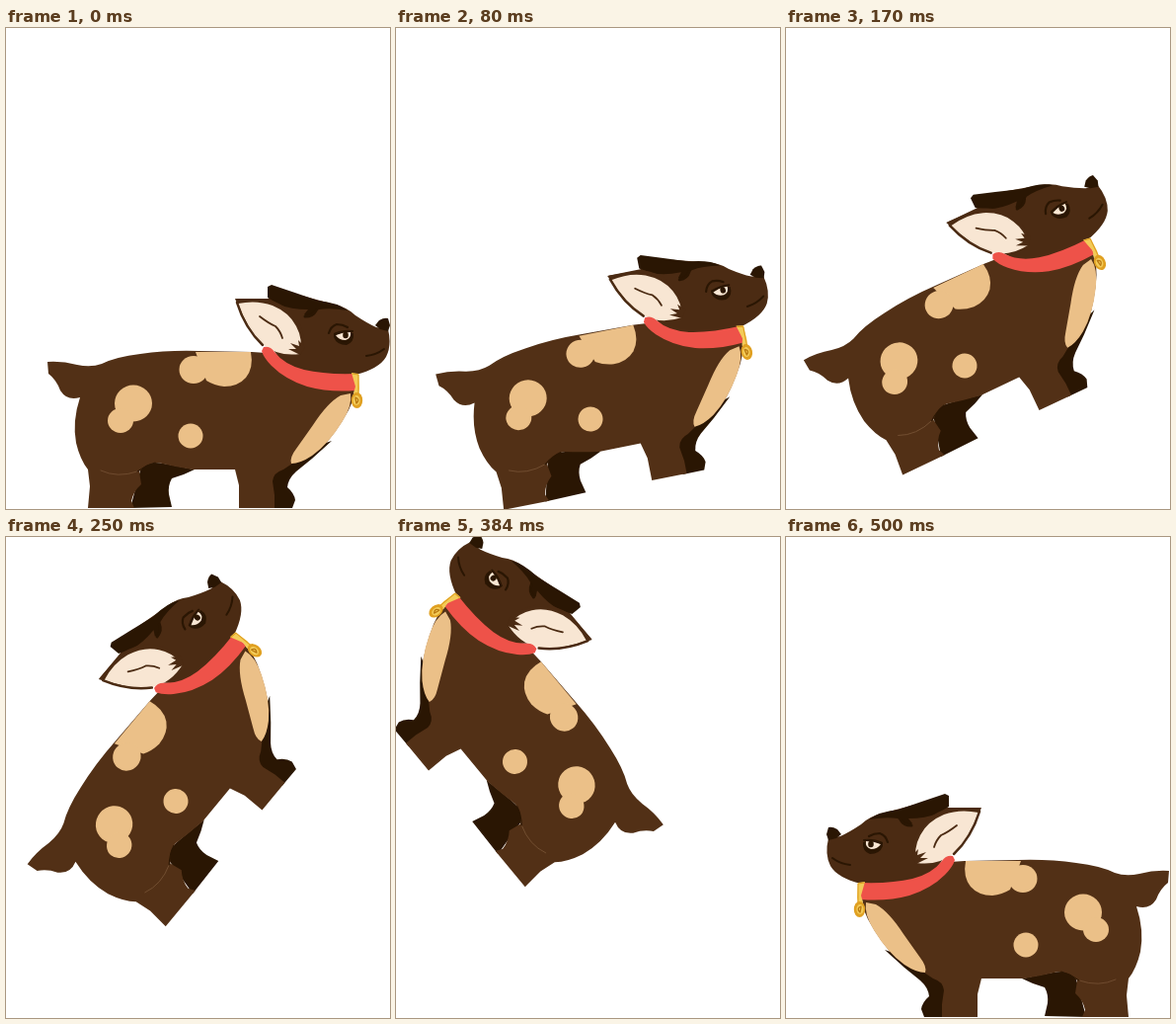
Recreate the animation shown at these times as an HTML page with a canvas. Size 389x487 px, loop 0.58 s.

```html
<!DOCTYPE html>
<html lang="en">
<head>
<meta charset="utf-8">
<title>Tumbling dog</title>
<style>
html, body { margin: 0; width: 100%; height: 100%; overflow: hidden; background: #fff; }
canvas { display: block; }
</style>
</head>
<body>
<canvas id="stage" width="389" height="487"></canvas>
<script>
const ctx = document.getElementById('stage').getContext('2d');

const BROWN = '#523016', HEAD = '#4b2b13', DARK = '#2a1603', TAN = '#ebc088',
      CREAM = '#f8e6d3', RED = '#ee5249', GOLD = '#e0a021', PALE = '#f3cb58';

// The dog turns about the small spot on its belly.
const PIVOT = { x: 187, y: 413 };

// Each pose: hold in ms, pivot position, upward tilt in degrees, facing (1 right, -1 left).
const poses = [
  { hold: 80, x: 187, y: 413, tilt: 0, face: 1 },
  { hold: 90, x: 197, y: 396, tilt: 11.2, face: 1 },
  { hold: 80, x: 181, y: 342, tilt: 25.3, face: 1 },
  { hold: 80, x: 172, y: 267.5, tilt: 50.3, face: 1 },
  { hold: 90, x: 120.5, y: 227.5, tilt: 50.3, face: -1 },
  { hold: 80, x: 183.5, y: 287, tilt: 24.2, face: -1 },
  { hold: 80, x: 243, y: 413, tilt: 0, face: -1 }
];
const loop = poses.reduce((sum, p) => sum + p.hold, 0);

function fill(color, d) {
  ctx.fillStyle = color;
  ctx.fill(new Path2D(d));
}

function line(color, width, d) {
  ctx.strokeStyle = color;
  ctx.lineWidth = width;
  ctx.stroke(new Path2D(d));
}

function oval(color, x, y, rx, ry = rx) {
  ctx.fillStyle = color;
  ctx.beginPath();
  ctx.ellipse(x, y, rx, ry, 0, 0, Math.PI * 2);
  ctx.fill();
}

function drawLegs() {
  fill(DARK, 'M137 444 Q146 438 160 441 L191 447 L180 452 L168 456 Q164 463 165 472 L168 485 L126 486 Z');
  fill(DARK, 'M330 418 L310 436 L294 449 Q286 456 285 465 Q292 471 293 478 L290 486 L268 486 L264 440 Z');
}

function drawBody() {
  fill(BROWN, 'M42 338 Q57 337 72 341 Q86 344 97 340 Q111 333 136 330 Q164 326 195 327 L249 328 L264 329 ' +
    'L300 345 L354 352 Q354 374 347 387 Q334 411 318 427 Q304 439 290 441 L281 447 Q271 450 270 459 ' +
    'L272 473 L272 486 L236 486 L236 463 L232 447 L189 447 Q170 444 154 440 Q143 440 135 449 ' +
    'L137 462 Q129 469 127 479 L130 486 L83 486 L85 464 L83 447 Q75 437 71 420 Q67 398 75 374 ' +
    'Q62 378 55 367 Q51 356 43 350 Z');
  line('#765235', 0.8, 'M96 448 Q113 456 133 449');
  line(DARK, 1, 'M133 449 Q142 442 151 440');
}

function drawSpots() {
  fill(TAN, 'M192 328 L248 328 Q251 344 243 354 Q235 363 221 363 Q211 362 203 357 Z');
  oval(TAN, 190, 346, 14.5, 14);
  oval(TAN, 129, 380, 19, 18.5);
  oval(TAN, 116, 397.5, 13, 12.5);
  oval(TAN, PIVOT.x, PIVOT.y, 12.5);
  fill(TAN, 'M349 370 Q351 382 341 398 Q327 421 310 433 Q298 441 289 441 Q287 435 294 426 ' +
    'L311 402 Q326 379 339 372 Z');
}

function drawHead() {
  fill(HEAD, 'M233 274 L266 274 L300 271 L333 280 Q346 283 354 291 Q366 299 375 303 L387 305 ' +
    'Q391 321 385 333 Q378 345 354 351 L320 352 L284 344 L270 325 L295 310 Z');
  fill(DARK, 'M265 262 L269 260 Q293 268 316 276 Q336 278 346 286 Q328 283 317 285 L306 293 ' +
    'L302 290 L306 285 Q288 285 277 280 L265 273 Z');
  line(DARK, 3, 'M303 292 Q311 292 314 286');
  fill(DARK, 'M374 301 L378 296 Q383 293 387 294 L389 301 L387 307 L379 305 Z');
}

function drawEar() {
  fill(HEAD, 'M232 274 L267 275 Q287 282 296 296 Q306 314 298 331 L278 330 Q251 314 240 293 Z');
  fill(CREAM, 'M235 279 Q254 275 270 281 Q287 288 294 302 Q301 315 298 330 Q276 333 261 321 Q245 306 235 279 Z');
  line(HEAD, 2.5, 'M234 278 Q242 304 260 321');
  line(HEAD, 1.8, 'M257 292 Q266 299 273 302 Q278 307 280 314');
  fill(HEAD, 'M298 331 L286 325 L294 325 L288 319 L297 322 L296 316 L303 323 Z');
}

function drawFace() {
  line(DARK, 2.2, 'M327 309 Q329 302 335 300 Q341 300 346 303');
  fill(DARK, 'M332 309 Q342 306 352 309 Q353 318 345 321 Q335 321 332 313 Z');
  fill(CREAM, 'M334 311 Q341 308 349 308 Q350 314 344 316 Q337 316 334 311 Z');
  oval(DARK, 344, 311, 2.8, 3.2);
  line(DARK, 2, 'M333 310 Q341 306 351 307');
  line(DARK, 2, 'M365 332 Q375 331 383 325');
}

function drawCollar() {
  fill(RED, 'M261 323 Q268 322 272 328 Q282 341 302 346 Q323 351 354 350 L354 367 ' +
    'Q327 369 305 363 Q283 356 269 342 Q261 334 259 327 Z');
  fill(PALE, 'M350 349 L357 350 L358 365 L357 370 L352 370 L354 363 Z');
  line(GOLD, 1.2, 'M351 350 L357 351 L357 370');
  oval(GOLD, 355.5, 377, 5.7, 8);
  oval(PALE, 355, 377, 3.6, 5);
  line('#b97911', 1.3, 'M354 374 Q359 376 355 380 L354 375');
}

function drawDog(pose) {
  ctx.setTransform(1, 0, 0, 1, 0, 0);
  ctx.fillStyle = '#fff';
  ctx.fillRect(0, 0, 389, 487);
  ctx.translate(pose.x, pose.y);
  ctx.scale(pose.face, 1);
  ctx.rotate(-pose.tilt * Math.PI / 180);
  ctx.translate(-PIVOT.x, -PIVOT.y);
  ctx.lineCap = ctx.lineJoin = 'round';
  drawLegs();
  drawBody();
  drawSpots();
  drawHead();
  drawEar();
  drawFace();
  drawCollar();
}

function poseAt(ms) {
  let t = ms % loop;
  for (const p of poses) {
    if (t < p.hold) return p;
    t -= p.hold;
  }
  return poses[0];
}

const start = performance.now();
function tick() {
  drawDog(poseAt(performance.now() - start));
  requestAnimationFrame(tick);
}
tick();
</script>
</body>
</html>
```
